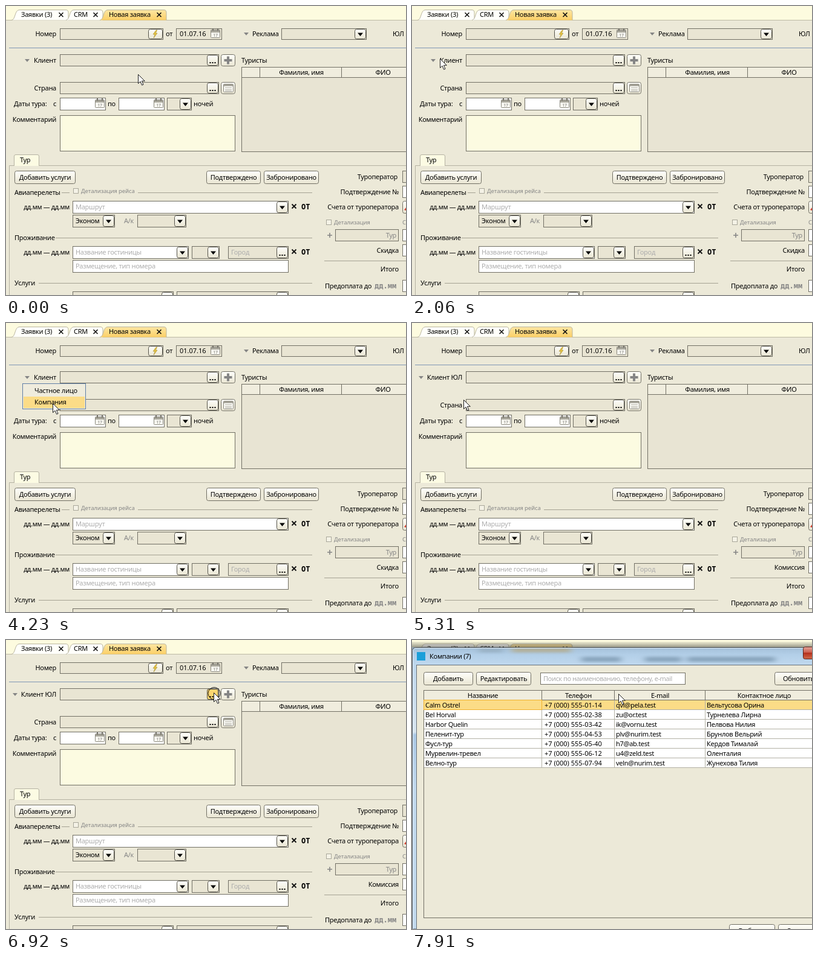
Write an HTML page that moves like this. It is 661 px wide and 479 px high and loops after 8 s.

```html
<!DOCTYPE html>
<html lang="ru">
<head>
<meta charset="utf-8">
<title>Новая заявка</title>
<style>
html, body { margin: 0; width: 100%; height: 100%; overflow: hidden; background: #ece9d8; }
svg { display: block; width: 661px; height: 479px; }
text { font: 11px "Noto Sans", "Open Sans", sans-serif; letter-spacing: -.28px; white-space: pre; }
text.num { letter-spacing: 0; }
text.hint { letter-spacing: -.45px; }
text.small { font-size: 9.5px; letter-spacing: -.1px; }
text.date { font-size: 10.8px; font-weight: 500; }
text.mono { font: bold 12px "DejaVu Sans Mono", monospace; letter-spacing: 0; }
text.tiny { font-size: 7px; }
</style>
</head>
<body>
<svg id="stage" viewBox="0 0 661 479" xmlns="http://www.w3.org/2000/svg"></svg>
<script>
const BG = '#ece9d8', EDGE = '#716f64', OFF = '#e9e5d3', HINT = '#adadad', GRAY = '#858585', GOLD = '#fbdc87';

const text = (x, y, s, o = {}) =>
  `<text x="${x}" y="${y}" text-anchor="${o.at || 'start'}" fill="${o.fill || '#000'}" class="${o.cls || ''}">${s}</text>`;
const end = (x, y, s, o) => text(x, y, s, { at: 'end', ...o });
const mid = (x, y, s, o) => text(x, y, s, { at: 'middle', ...o });
const rect = (x, y, x2, y2, fill, stroke = EDGE, r = 0) =>
  `<rect x="${x + .5}" y="${y + .5}" width="${x2 - x - 1}" height="${y2 - y - 1}" rx="${r}" fill="${fill}" stroke="${stroke}"/>`;
const fill = (x, y, x2, y2, c) => `<rect x="${x}" y="${y}" width="${x2 - x}" height="${y2 - y}" fill="${c}"/>`;
const path = (d, f, s = 'none', w = 1) => `<path d="${d}" fill="${f}" stroke="${s}" stroke-width="${w}"/>`;
const hline = (x, x2, y, c = '#a5a293') => fill(x, y, x2, y + 1, c);
const group = (id, s) => `<g id="${id}">${s}</g>`;

const button = (x, y, x2, y2, s = '') => rect(x, y, x2, y2, 'url(#btn)', EDGE, 3) + mid((x + x2) / 2, y + 15, s);
const knob = (x, y, x2, y2, f = 'url(#btn)') => rect(x, y, x2, y2, f, '#55534a', 3);
const dots = (x, y, x2, y2, f) => knob(x, y, x2, y2, f) +
  [-4, 0, 4].map(d => fill((x + x2) / 2 + d - 1, y2 - 6, (x + x2) / 2 + d + 1, y2 - 4, '#000')).join('');
const tri = (x, y, c = '#858585', w = 8) => path(`M${x} ${y}h${w}l${-w / 2} ${w * .6}z`, c);
const arrow = (x, y, x2, y2) => knob(x, y, x2, y2) + tri((x + x2) / 2 - 4.5, (y + y2) / 2 - 2, '#000', 9);
const field = (x, y, x2, y2, on, hint = '') =>
  rect(x, y, x2, y2, on ? '#fff' : OFF) + text(x + 5, y + 14, hint, { fill: HINT });
const combo = (x, y, x2, y2, on, hint) => field(x, y, x2, y2, on, hint) + arrow(x2 - 20, y + 1, x2 - 1, y2 - 1);
const picker = (x, y, x2, y2, on, hint) => field(x, y, x2, y2, on, hint) + dots(x2 - 20, y + 1, x2 - 1, y2 - 1);
const check = (x, y) => rect(x, y, x + 9, y + 9, '#f4f2e6', '#a9a79a');
const plus = (x, y, r, w, c = '#858585') => path(`M${x - r} ${y}h${2 * r}M${x} ${y - r}v${2 * r}`, 'none', c, w);
const cross = (x, y, r, w = 1.6) => path(`M${x - r} ${y - r}l${2 * r} ${2 * r}m0 ${-2 * r}l${-2 * r} ${2 * r}`, 'none', '#111', w);
const calendar = (x, y) => rect(x, y + 2, x + 16, y + 16, '#f8f7f0', '#8a887e', 1) + fill(x + 1, y + 3, x + 15, y + 7, '#a8a69b') +
  fill(x + 3, y, x + 5, y + 4, '#77756c') + fill(x + 11, y, x + 13, y + 4, '#77756c') + mid(x + 8, y + 14, '17', { cls: 'tiny', fill: '#777' });

const tab = (x, x2, s, f, tx) =>
  path(`M${x} 23.5C${x + 7} 23 ${x + 5} 6.5 ${x + 13} 6.5H${x2 - 4}Q${x2} 6.5 ${x2} 11V23.5`, f, '#b9b5a0') +
  text(tx, 18, s) + cross(x2 - 12, 14.5, 3.5);

function mainWindow() {
  const gray = { fill: GRAY }, small = { fill: GRAY, cls: 'small' };
  let s = fill(0, 0, 661, 479, BG) + fill(0, 0, 661, 23, '#fdfbdf') + hline(0, 661, 23, '#bdb9a4');
  s += tab(9, 103, 'Заявки (3)', '#fffffa', 25) + tab(99, 160, 'CRM', '#fffffa', 112) + tab(155, 265, 'Новая заявка', 'url(#tab)', 170);

  s += end(83, 50, 'Номер') + field(89, 37, 260, 56) + knob(235, 38, 259, 55) +
    path('M248 40l-5 7h3l-2 6 6-8h-3l3-5z', '#e8c43c', '#a08a3a', .6);
  s += text(264, 50, 'от') + field(281, 37, 357, 56) + text(287, 50, '01.07.16', { cls: 'num' }) + calendar(338, 37);
  s += tri(393, 44) + text(407, 50, 'Реклама') + combo(455, 37, 596, 56) + text(639, 50, 'ЮЛ') + hline(5, 661, 69, '#7f97b4');

  s += group('person', tri(31, 88) + end(83, 94, 'Клиент')) + group('firm', tri(11, 88) + end(83, 94, 'Клиент ЮЛ'));
  s += picker(89, 80, 352, 100) + group('hover', dots(332, 81, 351, 99, '#fdd670'));
  s += button(355, 80, 379, 100) + plus(367, 90, 6.5, 4);
  s += end(83, 140, 'Страна') + picker(89, 126, 352, 146) + button(355, 126, 379, 146) +
    rect(359, 129, 376, 143, '#fafaf5', '#8a887e', 1) + fill(360, 130, 375, 133, '#aaa89d') +
    [135, 138, 140].map(y => hline(362, 373, y, '#b5b3a8')).join('');
  s += text(13, 166, 'Даты тура:') + end(83, 166, 'с') + field(89, 152, 165, 173, 1) + calendar(147, 153) +
    text(168, 166, 'по') + field(186, 152, 262, 173, 1) + calendar(244, 153) + combo(266, 152, 307, 173) + text(310, 166, 'ночей');
  s += end(83, 192, 'Комментарий') + rect(89, 181, 379, 241, '#fcfbe1');

  s += text(389, 94, 'Туристы') + rect(389, 101, 670, 242, '#e8e4d3') + fill(390, 102, 661, 118, '#f0edde') + hline(390, 661, 118, EDGE) +
    fill(419, 102, 420, 119, EDGE) + fill(554, 102, 555, 119, EDGE) + mid(488, 114, 'Фамилия, имя') + mid(623, 114, 'ФИО');

  s += path('M5.5 479V264.5H661', 'none', '#b5b2a2') + path('M13.5 265V249Q13.5 246.5 16 246.5H52Q54.5 246.5 54.5 249V265', '#fcfbe3', '#b5b2a2') + text(23, 259, 'Тур');
  s += button(14, 273, 115, 295, 'Добавить услуги') + button(331, 273, 421, 295, 'Подтверждено') + button(426, 273, 517, 295, 'Забронировано');

  s += text(14, 313, 'Авиаперелеты') + hline(92, 105, 309) + check(111, 302) + text(124, 310, 'Детализация рейса', small) + hline(218, 506, 309);
  for (const y of [337, 412])
    s += end(105, y, 'дд.мм — дд.мм', { cls: 'date' }) + cross(476, y - 5, 3.5, 1.8) + text(488, y, 'ОТ', { cls: 'mono' });
  s += combo(110, 323, 467, 344, 1, 'Маршрут') + combo(110, 346, 180, 367) + text(115, 360, 'Эконом') +
    text(195, 360, 'А/к', gray) + combo(217, 346, 298, 367);
  s += text(14, 388, 'Проживание') + hline(82, 506, 384) + combo(110, 398, 302, 419, 1, 'Название гостиницы') +
    combo(307, 398, 353, 419) + picker(367, 398, 467, 419, 0, 'Город') + field(110, 421, 467, 442, 1, 'Размещение, тип номера');
  s += text(14, 463, 'Услуги') + hline(54, 506, 459) + combo(110, 473, 277, 494) + combo(282, 473, 467, 494);

  s += end(647, 287, 'Туроператор') + field(655, 273, 680, 293) + end(649, 312, 'Подтверждение №') + field(655, 298, 680, 318, 1);
  s += end(649, 337, 'Счета от туроператора') + button(655, 323, 690, 344) + path('M658 338l3-4v5z', '#d23a2a');
  s += check(529, 354) + text(542, 362, 'Детализация', small) + text(655, 362, 'С', small);
  s += plus(535, 380, 4, 1.6) + field(544, 370, 649, 390) + end(645, 384, 'Тур', gray) + field(655, 370, 680, 390, 1);
  s += group('discount', end(649, 409, 'Скидка')) + group('fee', end(649, 409, 'Комиссия')) + field(655, 395, 680, 415, 1);
  s += hline(526, 661, 422) + end(649, 440, 'Итого') + text(527, 468, 'Предоплата до') +
    text(609, 468, 'дд.мм', { cls: 'mono', fill: GRAY }) + field(655, 454, 680, 474, 1);
  return s;
}

const menu = () => rect(27, 100, 132, 143, '#efecdd', '#5f7ea6') +
  group('item0', fill(29, 103, 130, 122, GOLD)) + group('item1', fill(29, 122, 130, 141, GOLD)) +
  text(47, 116, 'Частное лицо') + text(47, 135, 'Компания');

const rows = [
  ['Calm Ostrel', '+7 (000) 555-01-14', 'qvl@pela.test', 'Вельтусова Орина'],
  ['Bel Horval', '+7 (000) 555-02-38', 'zu@or.test', 'Турнелева Лирна'],
  ['Harbor Quelin', '+7 (000) 555-03-42', 'ik@vornu.test', 'Пелвова Нилия'],
  ['Пеленит-тур', '+7 (000) 555-04-53', 'plv@nurim.test', 'Брунлов Вельрий'],
  ['Фусл-тур', '+7 (000) 555-05-40', 'h7@ab.test', 'Кердов Тималай'],
  ['Мурвелин-тревел', '+7 (000) 555-06-12', 'u4@zeld.test', 'Оленталия'],
  ['Велно-тур', '+7 (000) 555-07-94', 'veln@nurim.test', 'Жунехова Тилия']
];

function companies() {
  const cols = [19, 214, 334, 484, 680], grid = '#b3b1a5', smudge = '#86a2ba';
  let s = fill(0, 3, 661, 13, 'url(#shade)') + fill(0, 12, 661, 479, '#8fa3b3');
  s += path('M.5 479V19Q.5 12.5 7 12.5H670V479z', 'url(#glass)', '#3f4a54');
  s += '<g filter="url(#blur)">' + fill(165, 14, 262, 20, '#b3ab8c') + fill(110, 15, 150, 20, '#93aabb') +
    fill(280, 28, 345, 36, smudge) + fill(385, 28, 445, 36, smudge) + fill(455, 28, 600, 36, smudge) + '</g>';
  s += path('M1.5 479V19Q1.5 13.5 7 13.5H661', 'none', '#e3eff8') + fill(8, 20, 22, 34, '#1b9fd9') + text(29, 31, 'Компании (7)');
  s += rect(646, 11, 680, 32, 'url(#red)', '#5c231c', 3) + rect(7, 41, 680, 490, BG, '#66707a');
  s += button(19, 53, 101, 75, 'Добавить') + button(106, 53, 197, 75, 'Редактировать') +
    rect(212, 54, 452, 74, '#fff') + text(217, 68, 'Поиск по наименованию, телефону, e-mail', { fill: HINT, cls: 'hint' }) +
    button(599, 53, 680, 75) + text(613, 68, 'Обновить');
  s += rect(19, 83, 680, 461, BG) + fill(20, 84, 661, 99, '#f0edde') + hline(20, 661, 99, EDGE) + fill(20, 100, 661, 212, '#fff') + fill(20, 100, 661, 115, GOLD);
  ['Название', 'Телефон', 'E-mail', 'Контактное лицо'].forEach((h, i) => s += mid([117, 275, 410, 582][i], 96, h));
  for (const x of cols.slice(1, 4)) s += fill(x, 84, x + 1, 100, EDGE) + fill(x, 100, x + 1, 212, grid);
  rows.forEach((row, i) => {
    s += hline(20, 661, 115 + 16 * i, grid);
    row.forEach((c, j) => s += text(cols[j] + (j == 1 ? 5 : 3), 112 + 16 * i, c, { cls: j == 1 ? 'num' : '' }));
  });
  s += rect(19, 99, 215, 116, 'none', '#f0b02c');
  s += button(524, 471, 600, 493, 'Выбрать') + button(605, 471, 690, 493) + text(619, 486, 'Отмена');
  return s;
}

const grad = (id, ...stops) => `<linearGradient id="${id}" x2="0" y2="1">` +
  stops.map(([o, c, a = 1]) => `<stop offset="${o}" stop-color="${c}" stop-opacity="${a}"/>`).join('') + '</linearGradient>';

document.getElementById('stage').innerHTML = '<defs>' +
  grad('btn', [0, '#fffffb'], [1, '#e9e5d2']) + grad('tab', [0, '#fee6a2'], [1, '#fbcf66']) +
  grad('shade', [0, '#55544c', .1], [1, '#45453f', .6]) + grad('red', [0, '#e2a197'], [.45, '#cc6050'], [.5, '#b5301d'], [1, '#cf6a4a']) +
  grad('glass', [0, '#a3bfd8'], [.025, '#b3cfe8'], [.06, '#bfd8ee'], [.3, '#d9e6f0'], [.31, '#abc9e6'], [.5, '#c3daef'], [1, '#c3daef']) +
  '<filter id="blur" x="-20%" y="-100%" width="140%" height="300%"><feGaussianBlur stdDeviation="6 2.5"/></filter></defs>' +
  mainWindow() + group('focus', rect(27, 82, 43, 99, 'none', '#222')) + group('menu', menu()) + group('dialog', companies()) +
  group('cursor', '<circle id="ring" cx="1" cy="1.5" r="10" fill="none" stroke="#111"/>' +
    path('M.5 .5V15.5L4 12.2 6.6 18.2 9 17.2 6.4 11.3H11.3Z', '#fff', '#1c1c1c'));

// time, x, y of the pointer tip
const moves = [
  [0, 218, 113], [1090, 215, 113], [1250, 190, 108], [1390, 172, 106], [1520, 154, 105], [1670, 120, 102], [1790, 91, 100],
  [1930, 64, 92], [2060, 46, 87], [2180, 40, 87], [2320, 38, 87], [2590, 37, 87], [3570, 41, 95], [3690, 52, 115],
  [3840, 62, 124], [3970, 70, 130], [4090, 75, 133], [4230, 77, 133], [5310, 85, 127], [5470, 120, 123], [5620, 195, 118],
  [5770, 255, 114], [5890, 302, 111], [6030, 322, 96], [6190, 346, 86], [6620, 344, 86], [6780, 343, 87], [7910, 341, 89]
];
// element, visible from, visible until
const spans = [
  ['focus', 2180, 3690], ['menu', 2990, 4780], ['item0', 3690, 3840], ['item1', 3840, 4780],
  ['person', 0, 4780], ['discount', 0, 4780], ['firm', 4780, 8000], ['fee', 4780, 8000],
  ['hover', 6190, 8000], ['dialog', 7080, 8000]
];
const clicks = [[2870, 2990], [4510, 4780], [6920, 7080]];
const byId = id => document.getElementById(id);
const show = (id, on) => byId(id).style.display = on ? '' : 'none';
const start = performance.now();

function draw() {
  const t = (performance.now() - start) % 8000;
  const [, x, y] = moves.findLast(m => m[0] <= t);
  byId('cursor').setAttribute('transform', `translate(${x} ${y})`);
  for (const [id, a, b] of spans) show(id, t >= a && t < b);
  show('ring', clicks.some(([a, b]) => t >= a && t < b));
  requestAnimationFrame(draw);
}
draw();
</script>
</body>
</html>
```
